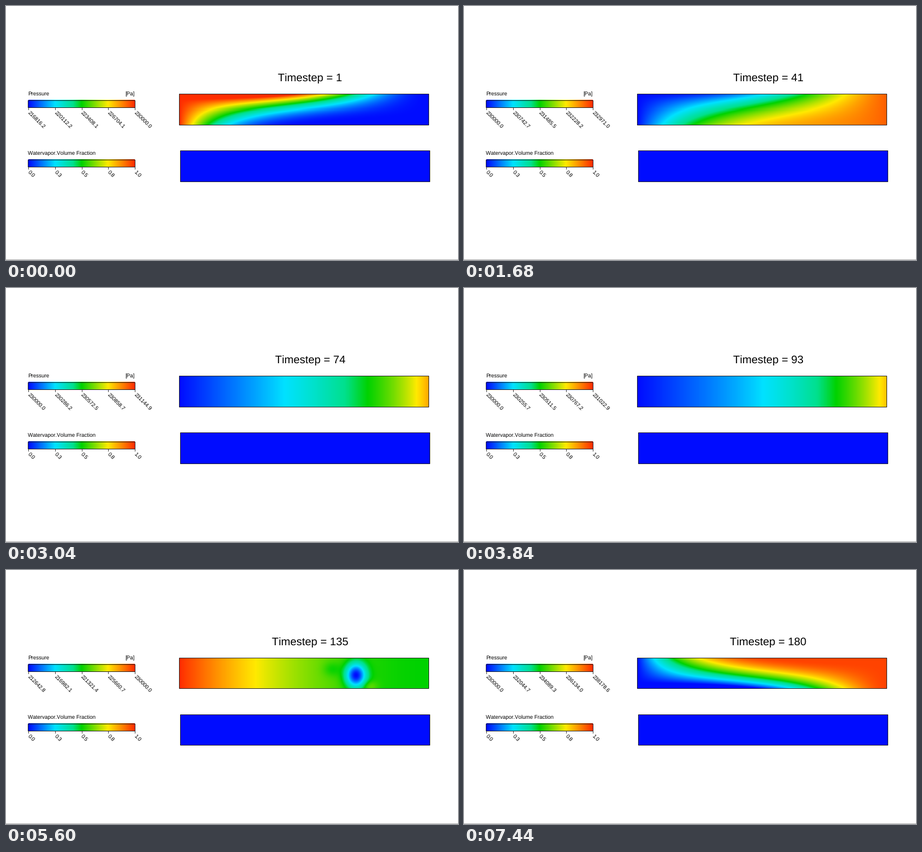
Animation of 828 by 466 pixels, one loop 7520 ms. Source, as a matplotlib script:

```python
import numpy as np
import matplotlib.pyplot as plt
from matplotlib.animation import FuncAnimation
from matplotlib.colors import LinearSegmentedColormap
from matplotlib.patches import Rectangle

W, H = 828, 466
FRAMES, STEP = 94, 80
INK = "#202020"
plt.rcParams.update({"font.family": "Liberation Sans",
                     "text.hinting": "none", "text.kerning_factor": 6})

cmap = LinearSegmentedColormap.from_list("flow", [
    (0, "#000cff"), (.25, "#00e2ff"), (.42, "#00e08c"),
    (.5, "#00d200"), (.75, "#ffea00"), (1, "#ff2d00")], N=512)

# channel rectangles: left, right, top, bottom
FLOW = (318, 774, 162, 218)
VAPOR = (320, 776, 266, 322)


def grid(x0, x1, y0, y1):
    return np.meshgrid(np.arange(x0, x1) + .5, np.arange(y0, y1) + .5)


X, Y = grid(*FLOW)
U = (X - 318) / 456                              # 0 inlet, 1 closed end
SLANT = np.sin(np.pi * U) * (Y - 190) / 456      # leaning wave fronts


def blob(x, y, rx, ry, height, at=(X, Y)):
    return height * np.exp(-((at[0] - x) / rx) ** 2
                           - ((at[1] - y) / ry) ** 2)


def falling(power, tilt=0):
    return (1 - np.clip(U + tilt * SLANT, 0, 1)) ** power


def rising(power, top, tilt):
    return top * (1 - falling(power, tilt))


def creeping(linear, jump, power):
    """Even rise with a steep end near the closed wall."""
    return linear * U + jump * U ** power


def burst():
    """Collapsing cavity: hot inlet, flat middle, turbulent far end."""
    base = .37 + .63 * np.exp(-(U / .19) ** 1.5)
    base -= .21 / (1 + np.exp((.87 - U) / .03))
    return (base + blob(521, 218, 20, 17, -.22) + blob(676, 180, 9, 15, .14)
            + blob(712, 161, 19, 14, -.3) + blob(711, 215, 13, 11, .45)
            + blob(689, 203, 13, 14, -.19) + blob(768, 213, 14, 12, -.1))


def bubble():
    """One low-pressure pocket in a gently falling field."""
    return (.5 + .5 * falling(1.9) + blob(641, 194, 18.5, 22, -.55)
            + blob(597, 183, 16, 13, -.07) + blob(666, 214, 14, 10, .08))


# frame, lowest and highest pressure, relative field, easing towards the next
KEYS = [
    (0, 216816.2, 230000.0, falling(2.1, 8), lambda w: w),
    (14, 230000.0, 234675.0, rising(1.6, .95, 6), lambda w: w),
    (28, 230000.0, 231266.9, creeping(.685, .185, 8), lambda w: w),
    (48, 230000.0, 231022.9, creeping(.45, .35, 4), lambda w: w ** 6),
    (60, -48211.1, 58975.1, burst(), lambda w: 1 - (1 - w) ** 2),
    (70, 212642.8, 230000.0, bubble(), lambda w: w),
    (93, 230000.0, 238178.6, rising(1.7, .97, -8), None),
]
BURST = 60

cells = grid(*VAPOR)
CLOUD = blob(683, 289, 14, 18, .38, cells) + blob(706, 270, 16, 13, .22, cells)


def pressure(i):
    """Relative field and its range, blended in absolute pressure."""
    k = max(n for n in range(len(KEYS) - 1) if KEYS[n][0] <= i)
    a, b = KEYS[k], KEYS[k + 1]
    w = a[4]((i - a[0]) / (b[0] - a[0]))
    p, below, above = 0, 0, 0
    for share, (_, lo, hi, f, _) in ((1 - w, a), (w, b)):
        p = p + share * (lo + (hi - lo) * f)
        # part of the scale that the field itself does not reach
        below += share * (hi - lo) * f.min()
        above += share * (hi - lo) * (1 - f.max())
    lo, hi = p.min() - below, p.max() + above
    return (p - lo) / (hi - lo), lo, hi


fig = plt.figure(figsize=(W / 72, (H + .001) / 72), dpi=72, facecolor="white")
ax = fig.add_axes([0, 0, 1, 1])
ax.axis("off")


def picture(data, x0, x1, y0, y1):
    return ax.imshow(data, cmap=cmap, vmin=0, vmax=1, aspect="auto",
                     extent=(x0, x1, y1, y0), interpolation="nearest")


def outline(x0, x1, y0, y1):
    return ax.add_patch(Rectangle((x0 - .5, y0 - .5), x1 - x0 + 1,
                                  y1 - y0 + 1, fill=False, ec=INK,
                                  lw=1, snap=False))


def label(x, y, s, size=9.8, **kw):
    return ax.text(x, y, s, fontsize=size, color="black",
                   va="baseline", **kw)


def legend(name, y):
    """Colour key with five slanted tick labels."""
    label(40.5, y - 9, name)
    picture(np.linspace(0, 1, 195)[None], 41, 236, y, y + 13)
    outline(41, 236, y + 1, y + 13)
    ticks = []
    for x in np.linspace(41, 236, 5):
        ax.plot([x, x], [y + 13, y + 17], color=INK, lw=.9)
        ticks.append(label(x - 2.5, y + 23.5, "", rotation=-45,
                           rotation_mode="anchor", ha="left"))
    return ticks


def set_ticks(ticks, lo, hi):
    for tick, v in zip(ticks, np.linspace(lo, hi, 5)):
        tick.set_text(f"{v + 1e-6:.1f}")


p_ticks = legend("Pressure", 173)
label(236, 164, "[Pa]", ha="right")
set_ticks(legend("Watervapor.Volume Fraction", 282), 0, 1)
title = label(557.3, 138, "", 20.2, ha="center")

panels = [(picture(data, *box), outline(*box), box)
          for data, box in ((U, FLOW), (CLOUD, VAPOR))]
ax.plot([0, W], [464.8, 464.8], color="#a8a8a8", lw=1)
ax.set_xlim(0, W)
ax.set_ylim(H, 0)


def draw(i):
    rel, lo, hi = pressure(i)
    vapor = CLOUD * np.interp(i, [BURST - 6, BURST, BURST + 5], [0, 1, 0])
    lift = int(i >= BURST - 5)     # both channels end a pixel higher
    for data, (img, edge, (x0, x1, y0, y1)) in zip((rel, vapor), panels):
        img.set_data(data)
        img.set_extent((x0, x1, y1 - lift, y0))
        edge.set_height(y1 - lift - y0 + 1)
    set_ticks(p_ticks, lo, hi)
    title.set_text(f"Timestep = {round(1 + 1.92 * i)}")
    ax.set_xlim(0, W)
    ax.set_ylim(H, 0)
    return []


anim = FuncAnimation(fig, draw, frames=FRAMES, interval=STEP,
                     repeat=True, repeat_delay=0, blit=False)
plt.show()
```
